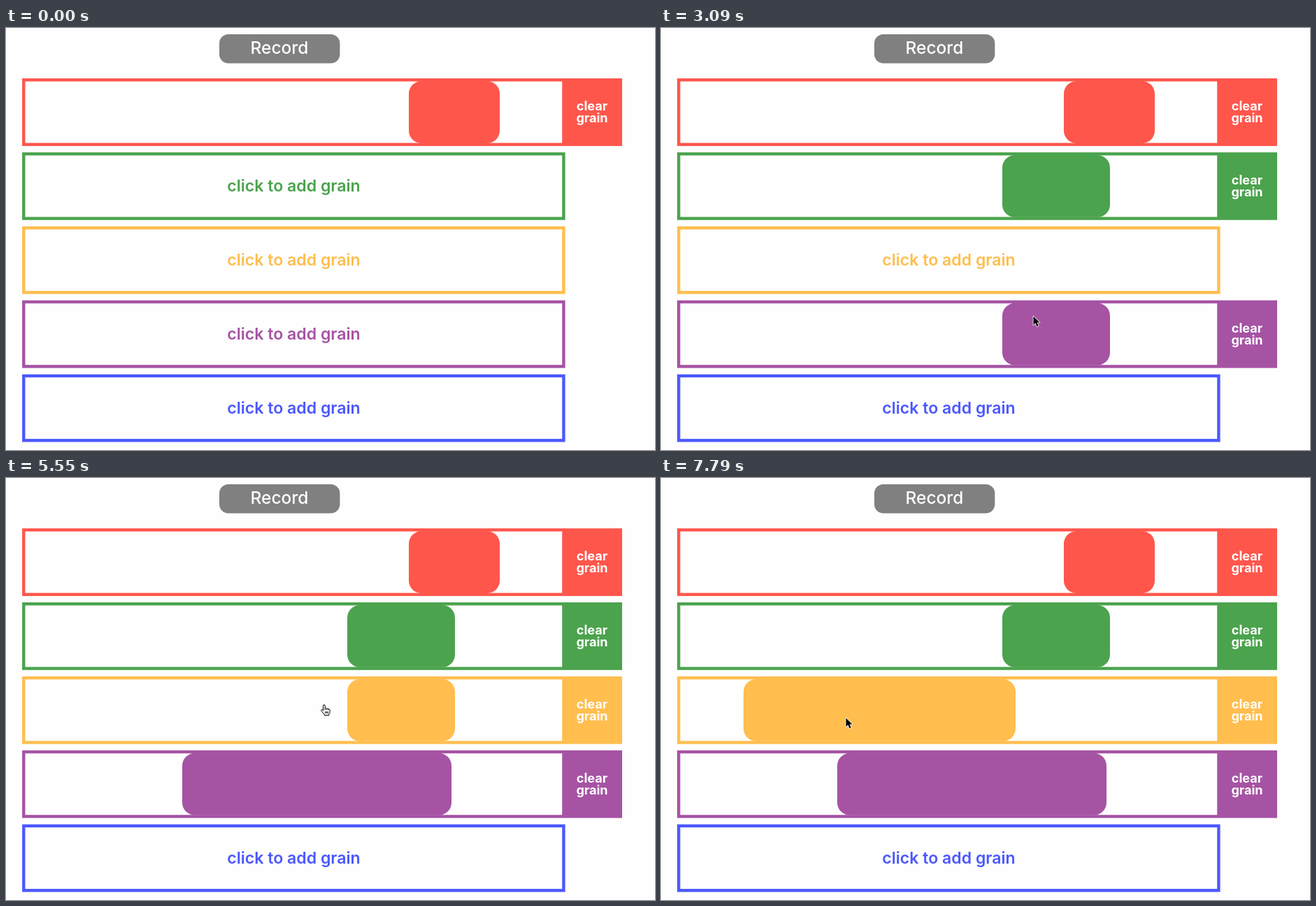
Animation, 928 px wide and 604 px high, one loop 7990 ms. Source, as an HTML page with a canvas:

```html
<!DOCTYPE html>
<html lang="en">
<head>
<meta charset="utf-8">
<title>Grain tracks</title>
<style>
  html, body { margin: 0; width: 100%; height: 100%; overflow: hidden; background: #fefefe; }
  canvas { display: block; }
</style>
</head>
<body>
<canvas id="stage" width="928" height="604"></canvas>
<script>
const ctx = document.getElementById('stage').getContext('2d');
const LOOP = 7990;
const STEP = LOOP / 68;      // the picture refreshes 68 times per loop
const LAG = 73;              // a dragged grain trails the pointer
const HOVER_HOLD = 130;      // the hand stays briefly after a click
const PAPER = '#fefefe';
const FONT = 'Inter, "Open Sans", sans-serif';
const TOP = 72.1, PITCH = 105.9, HEIGHT = 96.8, BORDER = 4.4;

const track = (color, added, left = 488, right = 642) => ({ color, added, left, right });
const red = track('#ff564c', 0, 576, 706);
const green = track('#4ba34d', 1640);
const yellow = track('#ffbe4e', 5400);
const purple = track('#a653a4', 2700);
const blue = track('#4b58ff', Infinity);
const tracks = [red, green, yellow, purple, blue];
tracks.forEach((item, i) => item.y = TOP + PITCH * i);

// The pointer's journey; some moves drag a grain or one of its edges.
const ENTER = 200;
const move = (start, duration, x, y, grain, edges) => ({ start, duration, x, y, grain, edges });
const moves = [
  move(0, 1, 909, 520),
  move(240, 350, 608, 357),
  move(740, 550, 441, 226),
  move(1850, 730, 413, 438),
  move(2720, 330, 532, 412),
  move(3340, 300, 296, 433, purple, 'left right'),
  move(3900, 450, 384, 402),
  move(4360, 490, 615, 400, purple, 'right'),
  move(4950, 330, 455, 325),
  move(5580, 520, 491, 325),
  move(6209, 545, 256, 327, yellow, 'left'),
  move(6900, 400, 399, 344),
  move(7380, 300, 264, 343, yellow, 'left right')
];

function progress({ start, duration }, t) {
  const u = Math.min(1, Math.max(0, (t - start) / duration));
  return u * u * (3 - 2 * u);
}

function pointerAt(t) {
  return moves.reduce((p, m) => {
    const k = progress(m, t);
    return { x: p.x + (m.x - p.x) * k, y: p.y + (m.y - p.y) * k };
  }, moves[0]);
}

function grainAt(item, t) {
  let { left, right } = item;
  moves.forEach((m, i) => {
    if (m.grain !== item) return;
    const dx = (m.x - moves[i - 1].x) * progress(m, t - LAG);
    if (m.edges.includes('left')) left += dx;
    if (m.edges.includes('right')) right += dx;
  });
  return { left, right };
}

function rect(x, y, w, h, color) {
  ctx.fillStyle = color;
  ctx.fillRect(x, y, w, h);
}

function rounded(x, y, w, h, r, color) {
  ctx.fillStyle = color;
  ctx.beginPath();
  ctx.roundRect(x, y, w, h, r);
  ctx.fill();
}

function label(text, x, y, size, weight, color) {
  ctx.font = `${weight} ${size}px ${FONT}`;
  ctx.fillStyle = color;
  ctx.fillText(text, x, y);
}

function drawTrack(item, t) {
  const { y, color, added } = item;
  const active = t >= added;
  rect(23.1, y, active ? 857.9 : 776.5, HEIGHT, color);
  rect(23.1 + BORDER, y + BORDER, 776.5 - 2 * BORDER, HEIGHT - 2 * BORDER, PAPER);
  if (!active) {
    label('click to add grain', 411.5, y + 56, 23.1, 600, color);
    return;
  }
  const { left, right } = grainAt(item, t);
  rounded(left, y + BORDER - .4, right - left, HEIGHT - 2 * BORDER + .8, 18, color);
  label('clear', 838, y + 46, 18.1, 700, '#fff');
  label('grain', 838, y + 63, 18.1, 700, '#fff');
}

const arrow = new Path2D('M.5 .5V13L3.4 10.3 5.5 15.2 7.7 14.3 5.6 9.5H9.5Z');
const hand = new Path2D('M3.6 9V2Q3.6 .6 4.9 .6T6.2 2V5.6Q7.5 4.8 8.5 6Q9.8 5.4 10.8 6.6' +
  'Q13.2 6.3 13.2 8.6V10.5Q13.2 12.5 11.8 14V15.5H5.2V14.4L1 9.6Q.1 8.2 1.2 7.6Q2.2 7.3 3.6 9Z' +
  'M6.2 5.6V8M8.5 6V8M10.8 6.6V8.4M6.6 10V13M8.5 10V13M10.3 10V13');

function drawPointer(t) {
  const { x, y } = pointerAt(t);
  const overLabel = tracks.some(item => t < item.added + HOVER_HOLD &&
    x >= 316 && x <= 507 && Math.abs(y - item.y - 52) <= 14);
  ctx.save();
  ctx.lineJoin = 'round';
  if (overLabel) {
    ctx.translate(Math.round(x) - 5, Math.round(y) - 1);
    ctx.fillStyle = '#fff';
    ctx.strokeStyle = '#000';
    ctx.fill(hand);
    ctx.stroke(hand);
  } else {
    ctx.translate(Math.round(x), Math.round(y));
    ctx.strokeStyle = '#fff';
    ctx.lineWidth = 1.6;
    ctx.stroke(arrow);
    ctx.fillStyle = '#000';
    ctx.fill(arrow);
  }
  ctx.restore();
}

function draw(now) {
  const t = Math.floor(now % LOOP / STEP) * STEP;
  rect(0, 0, 928, 604, PAPER);
  ctx.textAlign = 'center';
  rounded(305, 9, 172.4, 41.6, 13, '#808080');
  label('Record', 391, 37, 24.5, 500, '#fff');
  tracks.forEach(item => drawTrack(item, t));
  if (t > ENTER) drawPointer(t);
}

const start = performance.now();
function frame() {
  draw(performance.now() - start);
  requestAnimationFrame(frame);
}
frame();
</script>
</body>
</html>
```
